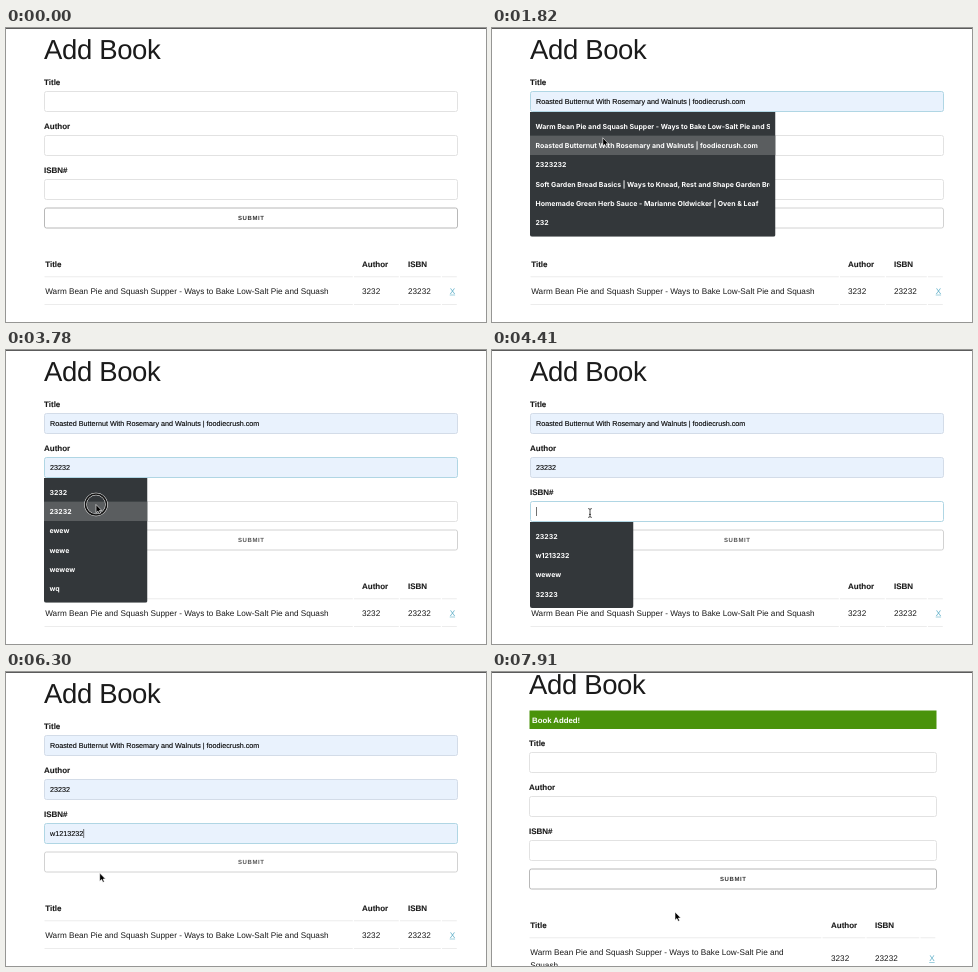
Animation of 480 by 294 pixels, one loop 8000 ms. Source, as an HTML page:

```html
<!DOCTYPE html>
<html lang="en">
<head>
<meta charset="utf-8">
<title>Add Book</title>
<style>
  html, body { margin: 0; width: 100%; height: 100%; overflow: hidden; background: #fff; }
  svg { display: block; }
  text { font-family: "Liberation Sans", Arial, sans-serif; fill: #1a1a1a; text-rendering: geometricPrecision; white-space: pre; }
  .h1 { font-size: 27.5px; letter-spacing: -.35px; }
  .label { font-size: 8px; font-weight: 700; stroke: #1a1a1a; stroke-width: .1px; }
  .cell { font-size: 8.2px; }
  .value { font-size: 7.2px; fill: #000; stroke: #000; stroke-width: .12px; }
  .submit { font-size: 6px; font-weight: 700; letter-spacing: .6px; }
  .option { font: 700 6.95px Inter, "Open Sans", sans-serif; fill: #fff; }
  .alert { font-size: 7.8px; font-weight: 700; fill: #fff; }
  .link { fill: #5fafc8; }
</style>
</head>
<body>
<svg id="stage" width="480" height="294" viewBox="0 0 480 294"></svg>
<script>
const LOOP = 8000, STEP = 70;
const SUBMITTED = 6930;

const saved = ["Warm Bean Pie and Squash Supper - Ways to Bake Low-Salt Pie", "and Squash"];
const book = "Roasted Butternut With Rosemary and Walnuts | foodiecrush.com";

// open/close: suggestion list; hover: [time, row]; focus until the next field is clicked
const fields = [
  { label: "Title", y: 63.5, open: 1050, close: 2380, blur: 2940, listWidth: 245.5,
    hover: [[1540, 0], [1750, 1]],
    options: [saved.join(" "), book, "2323232",
      "Soft Garden Bread Basics | Ways to Knead, Rest and Shape Garden Bread",
      "Homemade Green Herb Sauce - Marianne Oldwicker | Oven & Leaf", "232"] },
  { label: "Author", y: 107.5, open: 2940, close: 3920, blur: 4340, listWidth: 103.5,
    hover: [[3360, 0], [3570, 1]],
    options: ["3232", "23232", "ewew", "wewe", "wewew", "wq"] },
  { label: "ISBN#", y: 151.5, open: 4340, close: 6300, blur: SUBMITTED, listWidth: 103.5,
    hover: [[4620, 0], [4760, 1], [4970, 0], [5880, 1]],
    options: ["23232", "w1213232", "wewew", "32323"] }
];

// [from, to, field, at end of text]
const carets = [
  [1050, 1470, 0, false], [2380, 2940, 0, true], [2940, 3290, 1, false],
  [3920, 4340, 1, true], [4340, 4550, 2, false], [5390, 5880, 2, false], [6300, 6790, 2, true]
];

// [time, x, y, shape]
const path = [
  [70, 210, 190, "hand"], [280, 150, 114, "beam"], [630, 112, 58, "arrow"], [840, 115, 69, "beam"],
  [1400, 115, 69, "beam"], [1610, 114, 98, "arrow"], [1750, 111, 109, "arrow"], [1960, 110, 112, "arrow"],
  [2380, 110, 112, "beam"], [2450, 110, 112, "beam"], [2800, 105, 124, "beam"],
  [3220, 105, 124, "beam"], [3430, 100, 138, "arrow"], [3710, 90, 154.5, "arrow"],
  [3920, 90, 154.5, "arrow"], [4200, 98, 163, "beam"], [4480, 98, 163, "beam"],
  [4690, 100, 190, "arrow"], [4830, 100, 203, "arrow"], [4900, 100, 203, "arrow"],
  [5110, 98, 188, "arrow"], [5530, 98, 188, "arrow"], [5740, 95, 194.5, "arrow"],
  [5880, 94.5, 198, "arrow"], [6160, 93.7, 201, "arrow"], [6370, 93.7, 201, "arrow"],
  [6720, 146, 190, "hand"], [SUBMITTED, 147, 194, "beam"], [7280, 147, 194, "beam"],
  [7420, 165, 216, "arrow"], [7560, 183, 240, "arrow"]
];

// [from, to, radius]
const clicks = [
  [980, 1190, 8], [2100, 2380, 10.5], [2940, 3010, 8], [3710, 3920, 10.5],
  [4340, 4410, 8], [6090, 6300, 10.5], [6720, SUBMITTED, 8]
];

const esc = s => s.replace(/&/g, "&amp;");
const text = (cls, x, y, s) => `<text class="${cls}" x="${x}" y="${y}">${esc(s)}</text>`;
const rect = (x, y, w, h, fill, stroke = "none", r = 0) =>
  `<rect x="${x}" y="${y}" width="${w}" height="${h}" rx="${r}" fill="${fill}" stroke="${stroke}"/>`;
const during = (t, [from, to]) => t >= from && t < to;
const ease = p => p * p * (3 - 2 * p);

const ruler = document.createElement("canvas").getContext("2d");
function valueWidth(s) {
  ruler.font = '72px "Liberation Sans", Arial, sans-serif';
  return ruler.measureText(s).width / 10;
}

function hoveredRow(f, t) {
  let row = -1;
  for (const [at, i] of f.hover) if (t >= at) row = i;
  return row;
}

function field(f, i, t, x, w, dy) {
  const done = t >= SUBMITTED;
  const row = done ? -1 : hoveredRow(f, t);
  const value = row < 0 ? "" : f.options[row];
  const focused = during(t, [i ? f.open : 980, f.blur]);
  const border = focused ? "#b0d6e4" : value ? "#d3dce8" : "#e2e2e2";
  let out = text("label", x - .5, f.y + dy - 6.3, f.label)
    + rect(x, f.y + dy, w, 20, value ? "#e9f2fd" : "#fff", border, 2)
    + text("value", x + 5.5, f.y + dy + 12.6, value);
  const caret = carets.find(c => c[2] === i && during(t, c));
  if (caret) out += rect(x + 5.7 + (caret[3] ? valueWidth(value) : 0), f.y + 5.5, .7, 9, "#333");
  return out;
}

function list(f, t) {
  if (!during(t, [f.open, f.close])) return "";
  const pitch = 19.35, top = f.y + 20.5, h = f.options.length * pitch + 8.6;
  const row = hoveredRow(f, t);
  let out = rect(0, -3, f.listWidth, h + 3, "#33373a", "none", 2);
  if (row >= 0) out += rect(0, 4.3 + row * pitch, f.listWidth, pitch, "#5a5d5f");
  const rows = f.options.map((s, i) => text("option", 5.5, 16.5 + i * pitch, s)).join("");
  return `<svg x="38" y="${top}" width="${f.listWidth}" height="${h}">${out}`
    + `<svg width="${f.listWidth - 5.5}" height="${h}">${rows}</svg></svg>`;
}

function table(done, dy) {
  const cols = done ? [37.5, 330.5, 374.5, 428.5, 444.5] : [38.5, 348, 394, 436, 452];
  const [title, author, isbn, del] = done ? [38.3, 339, 383, 437.2] : [39.2, 356, 402, 443.7];
  const line = y => cols.slice(1).map((end, i) =>
    rect(cols[i], y, end - cols[i] - 1.2, .7, "#e4e4e4")).join("");
  const mid = 265.8 + dy + (done ? 6.5 : 0);
  const names = done
    ? text("cell", title, 265.8 + dy, saved[0] + " and") + text("cell", title, 278.8 + dy, "Squash")
    : text("cell", title, mid, saved.join(" "));
  return text("label", title, 238.8 + dy, "Title")
    + text("label", author, 238.8 + dy, "Author")
    + text("label", isbn, 238.8 + dy, "ISBN")
    + line(248.5 + dy) + names
    + text("cell", author, mid, "3232") + text("cell", isbn, mid, "23232")
    + text("cell link", del, mid, "X") + rect(del, mid + .9, 5.4, .6, "#5fafc8")
    + line(mid + 10.2);
}

function button(t, x, w, dy) {
  const active = t < 1190 || t >= 6650;
  return rect(x, 180 + dy, w, 20, "#fff", active ? "#b8b8b8" : "#d2d2d2", 2)
    + `<text class="submit" x="${x + w / 2 + .3}" y="${192.3 + dy}" text-anchor="middle" `
    + `style="fill:${active ? "#333" : "#555"}">SUBMIT</text>`;
}

const shapes = {
  arrow: '<path d="M0 0V8.2L1.9 6.5L3.2 9.3L4.6 8.7L3.4 6H5.8Z" fill="#000" stroke="#fff" stroke-width=".6"/>',
  beam: '<path d="M-1.8 -4.4Q0 -4.4 0 -3.4Q0 -4.4 1.8 -4.4M0 -3.6V3.6M-1.8 4.4Q0 4.4 0 3.4Q0 4.4 1.8 4.4M-1 1.4H1" fill="none" stroke="#222" stroke-width=".8"/>',
  hand: '<path d="M-.8 0Q0 -.8 .8 0V3L4 3.8Q4.6 4 4.4 5.5L3.6 9H-.8L-3 5.6Q-2.6 4.6 -.8 6Z" fill="#fff" stroke="#000" stroke-width=".8"/>'
};

function cursor(t) {
  if (t < path[0][0]) return "";
  let i = path.length - 1;
  while (path[i][0] > t) i--;
  const a = path[i], b = path[i + 1] || a;
  const p = b === a ? 0 : ease((t - a[0]) / (b[0] - a[0]));
  const x = a[1] + (b[1] - a[1]) * p, y = a[2] + (b[2] - a[2]) * p;
  const click = clicks.find(c => during(t, c));
  const circle = (r, color, width) =>
    `<circle r="${r}" fill="none" stroke="${color}" stroke-width="${width}"/>`;
  const ring = click ? circle(click[2], "#fff", 2.6) + circle(click[2], "#111", 1.6) : "";
  return `<g transform="translate(${x} ${y})">${ring}${shapes[p > .5 ? b[3] : a[3]]}</g>`;
}

function draw(t) {
  const done = t >= SUBMITTED;
  const scroll = t >= 7910 ? 9 : t >= 7840 ? 4 : 0;
  const x = done ? 37.5 : 38.5, w = done ? 407 : 413;
  const dy = done ? 26 - scroll : 0;
  return rect(0, 0, 480, 294, "#fff")
    + text("h1", done ? 37 : 38, 30.8 - scroll, "Add Book")
    + (done ? rect(37.5, 47.5 - scroll, 407, 18.5, "#4a930b") + text("alert", 40, 59.6 - scroll, "Book Added!") : "")
    + fields.map((f, i) => field(f, i, t, x, w, dy)).join("")
    + button(t, x, w, dy)
    + table(done, dy)
    + fields.map(f => list(f, t)).join("")
    + rect(0, 0, 480, 1, "#5c5c5c")
    + cursor(t);
}

const stage = document.getElementById("stage");
const start = performance.now();
let shown = -1;
function tick() {
  const t = Math.floor((performance.now() - start) % LOOP / STEP) * STEP;
  if (t !== shown) stage.innerHTML = draw(shown = t);
  requestAnimationFrame(tick);
}
tick();
</script>
</body>
</html>
```
